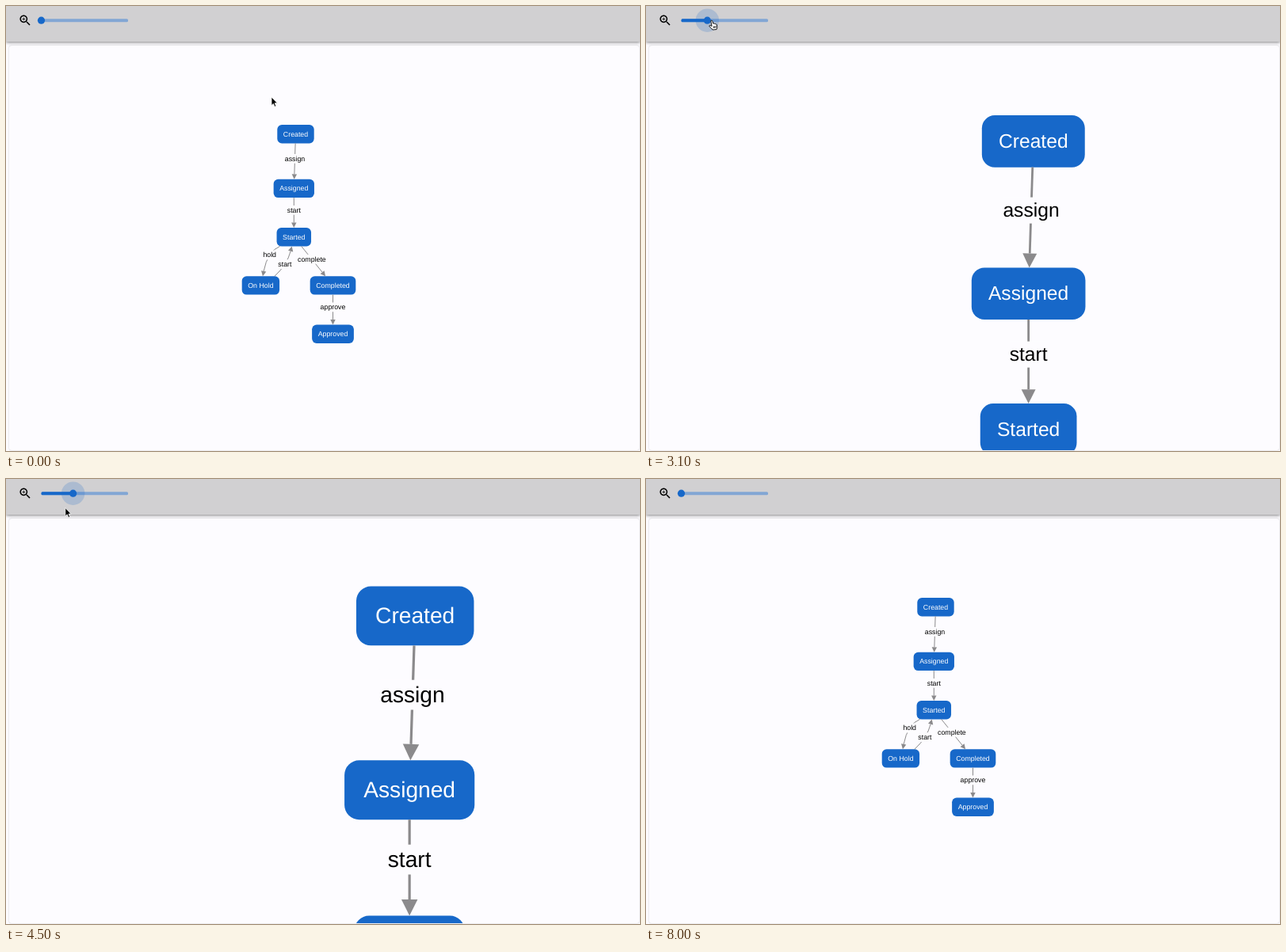
Write an HTML page that moves like this. It is 800x562 px and loops after 8500 ms.

```html
<!DOCTYPE html>
<html lang="en">
<head>
<meta charset="utf-8">
<title>Workflow zoom</title>
<style>
  html, body { margin: 0; width: 100%; height: 100%; overflow: hidden; background: #fdfcff; }
  #stage { position: relative; width: 800px; height: 562px; overflow: hidden; }
  #card { position: absolute; left: 4px; top: 50px; width: 795px; height: 511px;
    border-radius: 3px; background: #fdfcff; box-shadow: 0 0 2px rgba(0,0,0,.24); }
  #bar { position: absolute; left: 0; top: 0; width: 800px; height: 45px;
    background: #d1d0d2; box-shadow: 0 1px 4px rgba(0,0,0,.5); }
  svg { position: absolute; left: 0; top: 0; }
  text { font: 8.8px "Liberation Sans", Arial, sans-serif; text-anchor: middle;
    text-rendering: geometricPrecision; }
</style>
</head>
<body>
<div id="stage">
  <div id="card"></div>
  <svg width="800" height="562">
    <clipPath id="view"><rect x="4" y="50" width="795" height="511"/></clipPath>
    <g clip-path="url(#view)"><g id="graph"></g></g>
  </svg>
  <div id="bar"></div>
  <svg width="800" height="562">
    <path transform="translate(15.2 9.2) scale(.75)" d="M15.5 14h-.79l-.28-.27C15.41 12.59 16 11.11 16 9.5 16 5.91 13.09 3 9.5 3S3 5.91 3 9.5 5.91 16 9.5 16c1.61 0 3.09-.59 4.23-1.57l.27.28v.79l5 4.99L20.49 19l-4.99-5zm-6 0C7.01 14 5 11.99 5 9.5S7.01 5 9.5 5 14 7.01 14 9.5 11.99 14 9.5 14zm2.5-4h-2v2H9v-2H7V9h2V7h1v2h2v1z"/>
    <g transform="translate(44.5 18.2)" fill="#1768c9">
      <rect y="-2" width="109.5" height="4" rx="1.5" fill="#82a6d4"/>
      <rect id="fill" y="-2" height="4" rx="1.5"/>
      <circle id="halo" fill-opacity=".2"/>
      <circle id="thumb" r="4.6"/>
    </g>
    <g id="pointer" stroke-linejoin="round">
      <path id="arrow" d="M0 0V10.6L2.4 8.4L4 12.2L5.8 11.4L4.2 7.7H7.4Z" stroke="#fff" stroke-width=".8"/>
      <path id="hand" fill="#fff" stroke="#000" stroke-width=".9"
        d="M-1.2 .9Q-.9 -.1 0 .2Q.7 .4 .9 1.2L1.7 4.2Q2.5 3.5 3.3 4.4Q4.2 3.9 4.8 4.9Q6 4.6 6.3 5.8L6.8 8.4Q6.8 9.8 6 11.6L1.1 12Q-.4 9.9 -2.9 7.9Q-3.7 6.7 -2.4 6.4Q-1.4 6.4 .1 7.5ZM2.4 7.6V9.8M3.8 7.5V9.7M5.1 7.4V9.5"/>
    </g>
  </svg>
</div>
<script>
const LOOP = 8500, STEP = 100;
const BLUE = '#1768c9', GREY = '#8b8a8c', PAPER = '#fdfcff';
const NODE_H = 23.4, HEAD = 6.4, BEND = 15, LIFT = 4;
const $ = id => document.getElementById(id);
const graph = $('graph');

function add(tag, attrs, before = null) {
  const el = document.createElementNS('http://www.w3.org/2000/svg', tag);
  for (const k in attrs) el.setAttribute(k, attrs[k]);
  return graph.insertBefore(el, before);
}

// Text on a box that fits its width
function box(label, x, y, pad, height, fill, color, rx = 0) {
  const text = add('text', { x, y: y + 2.9, fill: color });
  text.textContent = label;
  const width = text.getComputedTextLength() + pad;
  add('rect', { x: x - width / 2, y: y - height / 2, width, height, rx, fill }, text);
}

function node(label, x, y) {
  box(label, x, y, 15.1, NODE_H, BLUE, '#fff', 5.8);
  return { x, y };
}

// Where the line from a node towards p leaves its top or bottom side
function exit(n, p) {
  const k = NODE_H / 2 / Math.abs(p.y - n.y);
  return { x: n.x + (p.x - n.x) * k, y: n.y + (p.y - n.y) * k };
}

function edge(a, b, label, bend = 0) {
  const dx = b.x - a.x, dy = b.y - a.y, len = Math.hypot(dx, dy);
  const c = { x: (a.x + b.x - 2 * bend * dy / len) / 2, y: (a.y + b.y + 2 * bend * dx / len) / 2 };
  const from = exit(a, c), tip = exit(b, c);
  if (bend) c.y -= LIFT;
  const angle = Math.atan2(tip.y - c.y, tip.x - c.x);
  const end = { x: tip.x - HEAD * Math.cos(angle), y: tip.y - HEAD * Math.sin(angle) };
  if (!bend) Object.assign(c, { x: (from.x + end.x) / 2, y: (from.y + end.y) / 2 });
  add('path', { d: `M${from.x} ${from.y}Q${c.x} ${c.y} ${end.x} ${end.y}`, fill: 'none', stroke: GREY });
  add('path', { d: `M0 0L${-HEAD} -3.2V3.2Z`, fill: GREY,
    transform: `translate(${tip.x} ${tip.y}) rotate(${angle * 180 / Math.PI})` });
  box(label, (from.x + 2 * c.x + end.x) / 4, (from.y + 2 * c.y + end.y) / 4, 0, 11.8, PAPER, '#000');
}

const created = node('Created', 68.5, 5.1);
const assigned = node('Assigned', 66.3, 73.8);
const started = node('Started', 66.3, 135.1);
const onHold = node('On Hold', 24.4, 196.3);
const completed = node('Completed', 115.5, 196.3);
const approved = node('Approved', 115.5, 257.6);
edge(created, assigned, 'assign');
edge(assigned, started, 'start');
edge(started, onHold, 'hold', BEND);
edge(onHold, started, 'start', BEND);
edge(started, completed, 'complete');
edge(completed, approved, 'approve');

// Pointer moves: start ms, end ms, then where it arrives; it rests in between
const moves = [
  [0, 900, 52, 22], [900, 1000, 39, 17], [1300, 2000, 46, 17],
  [2200, 2600, 53.5, 17], [2600, 3100, 83, 18], [3100, 3600, 158, 29],
  [3900, 4100, 150, 30], [4100, 4400, 84.5, 36], [4400, 4900, 36, 38],
  [5100, 5300, 40, 41], [5500, 5900, 94, 22], [5900, 6200, 114, 20],
  [6500, 7000, 18, 30], [7000, 7400, 264, 80], [7400, 7500, 336, 88]];

function pointerAt(t) {
  let x = 335, y = 115;
  for (const [start, end, toX, toY] of moves) {
    const p = Math.min(1, Math.max(0, (t - start) / (end - start)));
    x += (toX - x) * p;
    y += (toY - y) * p;
  }
  return { x, y };
}

const isPressed = t => t >= 2300 && t < 5600 || t >= 5900 && t < 7100;

// While pressed, the slider trails the pointer by one step and snaps to tenths
function zoomAt(t) {
  if (!isPressed(t)) return 1;
  const raw = 1 + (pointerAt(t - STEP).x - 44.5) / 18.25;
  return Math.round(Math.min(7, Math.max(1, raw)) * 10) / 10;
}

function draw(t) {
  const { x, y } = pointerAt(t), zoom = zoomAt(t);
  const knob = 18.25 * (zoom - 1);
  const onSlider = y <= 31 && x >= 40 && x < 165;
  const onThumb = Math.hypot(x - 44.5 - knob, y - 18.2) < 5;
  graph.setAttribute('transform', `translate(297 156.6) scale(${zoom})`);
  $('fill').setAttribute('width', knob);
  $('thumb').setAttribute('cx', knob);
  $('halo').setAttribute('cx', knob);
  $('halo').setAttribute('r', isPressed(t) ? 14.7 : onThumb ? 10.3 : 0);
  $('pointer').setAttribute('transform', `translate(${x} ${y})`);
  $('pointer').style.display = t < 7600 ? '' : 'none';
  $('arrow').style.display = onSlider ? 'none' : '';
  $('hand').style.display = onSlider ? '' : 'none';
}

const start = performance.now();
function tick() {
  const t = (performance.now() - start) % LOOP;
  draw(Math.floor(t / STEP) * STEP);
  requestAnimationFrame(tick);
}
tick();
</script>
</body>
</html>
```
